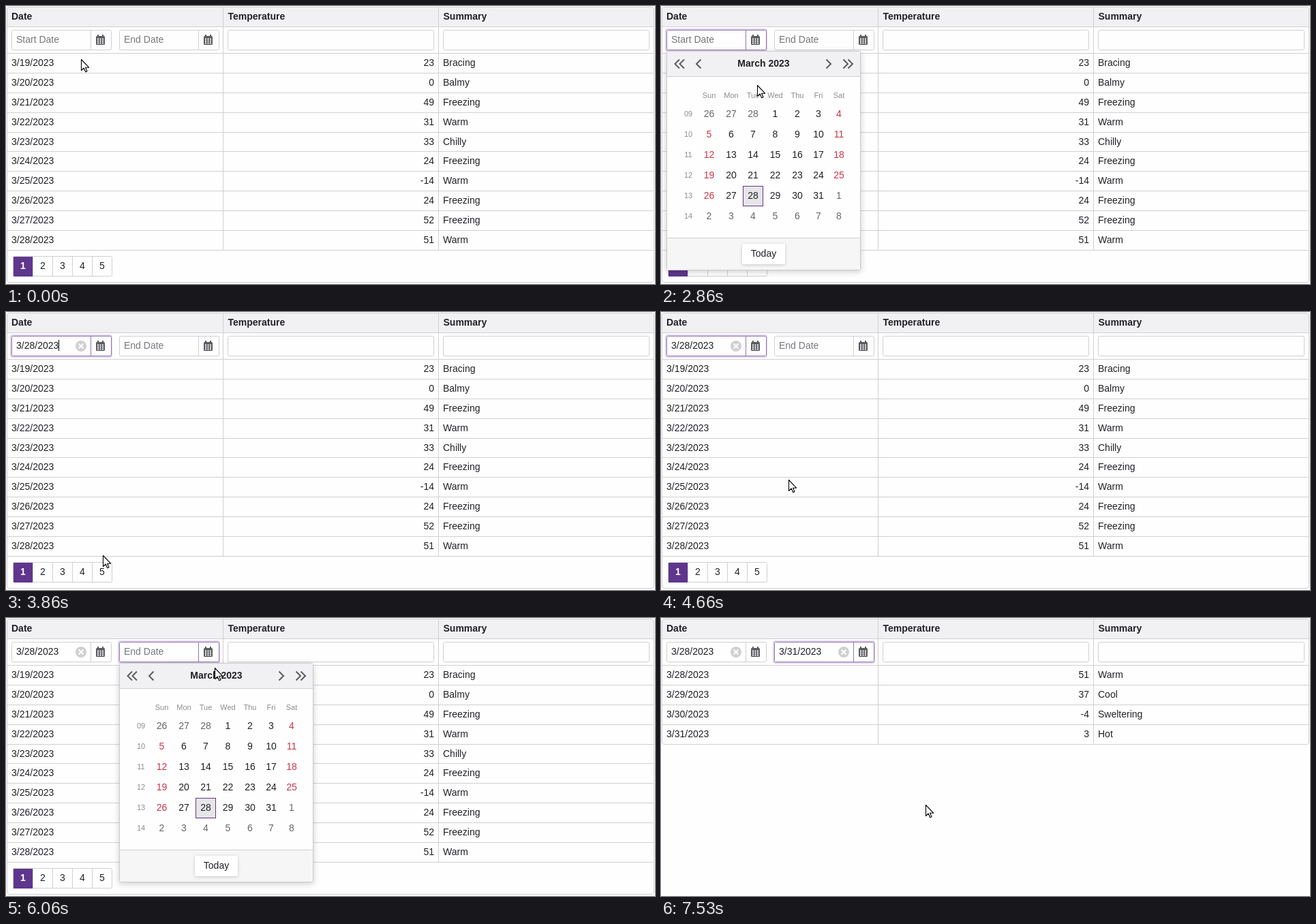
These frames come from a looping animation (952 by 408 pixels, 8000 ms). An HTML page:

```html
<!DOCTYPE html>
<html lang="en">
<head>
<meta charset="utf-8">
<title>Date range filter</title>
<style>
  html, body { margin: 0; width: 100%; height: 100%; overflow: hidden; background: #fefefe; }
  svg { display: block; font: 14px "Liberation Sans", Arial, sans-serif; fill: #212126; }
  .line { fill: none; stroke: #d0d0d2; }
  .bold { font-weight: bold; }
  .mid { text-anchor: middle; }
  .end { text-anchor: end; }
  .small { font-size: 11px; fill: #8c8c90; }
  .hint { fill: #77767c; }
  .other { fill: #66656a; }
  .red { fill: #cb3648; }
  .bar { fill: #f1f1f4; }
  .icon { fill: none; stroke: #5b5b60; stroke-width: 2; }
  .shadow { filter: drop-shadow(0 2px 4px #0003); }
  .lift { filter: drop-shadow(0 1px 2px #0003); }
  .pointer { fill: #fff; stroke: #000; stroke-width: 1.1; stroke-linejoin: round; }
</style>
</head>
<body>
<svg width="952" height="408" viewBox="0 0 952 408">
  <g id="scene"></g>
  <g id="cursor" class="pointer">
    <path id="arrow" d="M.5 .5V16.5L4.2 13 6.7 18.7 9 17.7 6.6 12.2H11.6z"/>
    <path id="hand" d="M-1.5 14.5V2a1.7 1.7 0 0 1 3.4 0V8.5a1.5 1.5 0 0 1 3 .3a1.5 1.5 0 0 1 3 .5a1.4 1.4 0 0 1 2.8 .7V15.5c0 2-1.8 3.5-1.8 5.5V23.3H-.8V21c-1.2-2-4.6-5.5-5-8c0-1.6 1.8-1.8 2.6-.7zM1.9 8.5V13M4.9 8.8V13M7.9 9.3V13"/>
  </g>
</svg>
<script>
const LOOP = 8000, SHIFT = 158;
const $ = id => document.getElementById(id);

const text = (x, y, s, cls = '') => `<text x="${x}" y="${y}" class="${cls}">${s}</text>`;
const rect = (x, y, w, h, attrs = '') => `<rect x="${x}" y="${y}" width="${w}" height="${h}" ${attrs}/>`;
const path = (d, cls = 'line') => `<path d="${d}" class="${cls}"/>`;

// ---- grid ----
const allRows = [[23, 'Bracing'], [0, 'Balmy'], [49, 'Freezing'], [31, 'Warm'], [33, 'Chilly'],
  [24, 'Freezing'], [-14, 'Warm'], [24, 'Freezing'], [52, 'Freezing'], [51, 'Warm']];
const someRows = [[51, 'Warm'], [37, 'Cool'], [-4, 'Sweltering'], [3, 'Hot']];

function grid(rows, firstDay, bottom) {
  let s = path('M1.5 30.5V5a3.5 3.5 0 0 1 3.5-3.5H947a3.5 3.5 0 0 1 3.5 3.5V30.5z', 'bar');
  s += text(8, 20, 'Date', 'bold') + text(325.5, 20, 'Temperature', 'bold') + text(641.5, 20, 'Summary', 'bold');
  const rowY = i => 69 + 29 * i - (i > 4);
  rows.forEach(([temp, summary], i) => {
    const y = rowY(i) + 19;
    s += text(8, y, `3/${firstDay + i}/2023`) + text(628, y, temp, 'end') + text(641, y, summary);
    s += path(`M1 ${rowY(i) + .5}H951`);
  });
  const last = rowY(rows.length) + .5;
  s += path(`M1 30.5H951M318.5 1V${last}M634.5 1V${last}`);
  if (bottom > last) s += path(`M1 ${last}H951`);
  s += rect(1.5, 1.5, 949, bottom - 1.5, 'rx="3.5" class="line"');
  for (const x of [325.5, 641.5]) s += rect(x, 35.5, 302, 29, 'rx="2" class="line"');
  return s;
}

function pager() {
  let s = rect(10.5, 367.5, 145, 29, 'rx="2" class="line"') + rect(11, 368, 28, 29, 'fill="#5f368d"');
  for (let i = 0; i < 5; i++) {
    if (i) s += path(`M${10.5 + 29 * i} 368V397`);
    s += `<g fill="${i ? '#212126' : '#fff'}">${text(25 + 29 * i, 386, i + 1, i ? 'mid' : 'mid bold')}</g>`;
  }
  return s;
}

// ---- date field ----
function calendarIcon(x) {
  let s = rect(x, 44, 13, 13, 'rx="1.5" fill="#5b5b60"') +
    rect(x + 2, 42, 2, 3, 'fill="#5b5b60"') + rect(x + 9, 42, 2, 3, 'fill="#5b5b60"');
  for (let i = 0; i < 9; i++)
    s += rect(x + 2 + i % 3 * 3.5, 47.5 + 3 * (i / 3 | 0), 2, 2, 'fill="#fefefe"');
  return s;
}

function field(x, hint, value, focus, hover, caret) {
  const edge = focus ? 'fill="none" stroke="#9478b6"' : 'class="line"';
  let s = '';
  if (focus) s += rect(x - 1, 34, 148, 32, 'rx="3" fill="none" stroke="#dcd2e8" stroke-width="2"');
  if (hover) s += rect(x + 117, 36, 29, 29, 'class="bar"');
  s += rect(x + .5, 35.5, 146, 29, 'rx="2" ' + edge) + `<path d="M${x + 116.5} 36V65" ${edge}/>`;
  s += text(x + 7, 54, value || hint, value ? '' : 'hint');
  if (value) {
    s += `<circle cx="${x + 102}" cy="50" r="8" fill="#d0d0d2"/>`;
    s += `<path d="M${x + 98.5} 46.5l7 7m0-7l-7 7" stroke="#fff" stroke-width="2"/>`;
  }
  if (caret) s += rect(x + (value ? 69 : 7), 41, 1, 16, 'fill="#000"');
  return s + calendarIcon(x + 124);
}

// ---- calendar popup ----
const columns = [70.5, 103, 135, 167.5, 200, 231, 261];
const dayNames = ['Sun', 'Mon', 'Tue', 'Wed', 'Thu', 'Fri', 'Sat'];

function popup(shift, hover) {
  let s = rect(8.5, 66.5, 284, 321, 'rx="2" fill="#fefefe" stroke="#cbcbce" class="shadow"');
  s += rect(9, 67, 283, 36, 'class="bar"') + rect(9, 341, 283, 46, 'fill="#f6f6f6"');
  s += path('M9 103.5H292M9 340.5H292');
  s += path('M27 78.500l-6.500 6.500 6.500 6.500M34 78.500l-6.500 6.500 6.500 6.500M58.500 78.500l-6.500 6.500 6.500 6.500' +
    'M242.500 78.500l6.500 6.500-6.500 6.500M267.500 78.500l6.500 6.500-6.500 6.500M274.500 78.500l6.500 6.500-6.500 6.500', 'icon');
  s += text(150.5, 89, 'March 2023', 'bold mid');
  dayNames.forEach((name, c) => s += text(columns[c], 135, name, 'small mid'));
  if (hover.col >= 0) s += rect(columns[hover.col] - 15, 144 + 30 * hover.row, 30, 30, 'class="bar"');
  s += rect(120.5, 264.5, 29, 29, 'fill="#e6e5e8" stroke="#5f368d"');
  for (let i = 0; i < 42; i++) {
    const row = i / 7 | 0, col = i % 7, y = 163 + 30 * row;
    if (!col) s += text(40, y - 1, String(9 + row).padStart(2, '0'), 'small mid');
    const tone = i < 3 || i > 33 ? 'other' : col % 6 ? '' : 'red';
    s += text(columns[col], y, new Date(2023, 1, 26 + i).getDate(), 'mid ' + tone);
  }
  s += rect(119, 349, 63, 30, `rx="2" fill="${hover.today ? '#f1f1f4' : '#fff'}" class="lift"`);
  s += text(150.5, 368, 'Today', 'mid');
  return `<g transform="translate(${shift})">${s}</g>`;
}

// ---- pointer motion: time, x, y ----
const keys = [[0, 110, 78], [1460, 110, 78], [1800, 143, 55], [2600, 143, 55], [2860, 141, 116],
  [3130, 176, 215], [3400, 142, 320], [3460, 140, 345], [3600, 142, 357], [4200, 142, 357],
  [4660, 187, 246], [5000, 271, 91], [5230, 299, 56], [5930, 299, 56], [6560, 385, 262],
  [6660, 388, 274], [LOOP, 388, 274]];

// Slope at a key; zero where the pointer rests or turns.
function slope(i, k) {
  const a = keys[i - 1], b = keys[i], c = keys[i + 1];
  if (!a || !c || (b[k] - a[k]) * (c[k] - b[k]) <= 0) return 0;
  return (c[k] - a[k]) / (c[0] - a[0]);
}

function pointerAt(t) {
  const i = keys.findIndex(key => key[0] > t) - 1;
  const a = keys[i], b = keys[i + 1], span = b[0] - a[0], u = (t - a[0]) / span, v = 1 - u;
  return [1, 2].map(k => Math.round(
    a[k] * v * v * (1 + 2 * u) + b[k] * u * u * (1 + 2 * v) +
    span * u * v * (slope(i, k) * v - slope(i + 1, k) * u)));
}

// ---- timeline ----
const caretStarts = [2100, 3860, 5400, 7000];
const within = (t, a, b) => t >= a && t < b;
let shown = '';

function draw(t) {
  const [x, y] = pointerAt(t);
  const open = within(t, 2100, 3860) ? 0 : within(t, 5460, 6900) ? SHIFT : -1;
  const px = x - open, row = Math.floor((y - 144) / 30);
  const inDays = open >= 0 && row >= 0 && row < 6 && px > 45 && px < 277;
  const hover = {
    row,
    col: inDays ? columns.findIndex(c => Math.abs(px - c) <= 15) : -1,
    today: open >= 0 && within(px, 119, 183) && within(y, 349, 379)
  };
  const overButton = left => within(x, left + 116, left + 147) && within(y, 35, 66);
  const hand = inDays || hover.today || overButton(8) || overButton(166);

  const since = caretStarts.filter(s => s <= t).pop();
  const caret = since !== undefined && Math.floor((t - since) / 530) % 2 === 0;
  const focusA = within(t, 2100, 5400), focusB = t >= 5400;
  const filtered = t >= 7000;

  let s = filtered ? grid(someRows, 28, 185.5) : grid(allRows, 19, 405.5) + pager();
  s += field(8, 'Start Date', t >= 3860 && '3/28/2023', focusA, overButton(8), focusA && caret);
  s += field(166, 'End Date', t >= 6900 && '3/31/2023', focusB, overButton(166), focusB && caret);
  if (open >= 0) s += popup(open, hover);
  if (s !== shown) $('scene').innerHTML = shown = s;

  $('cursor').setAttribute('transform', `translate(${x} ${y})`);
  $('arrow').style.display = hand ? 'none' : '';
  $('hand').style.display = hand ? '' : 'none';
}

function frame() {
  draw(performance.now() % LOOP);
  requestAnimationFrame(frame);
}
frame();
</script>
</body>
</html>
```
